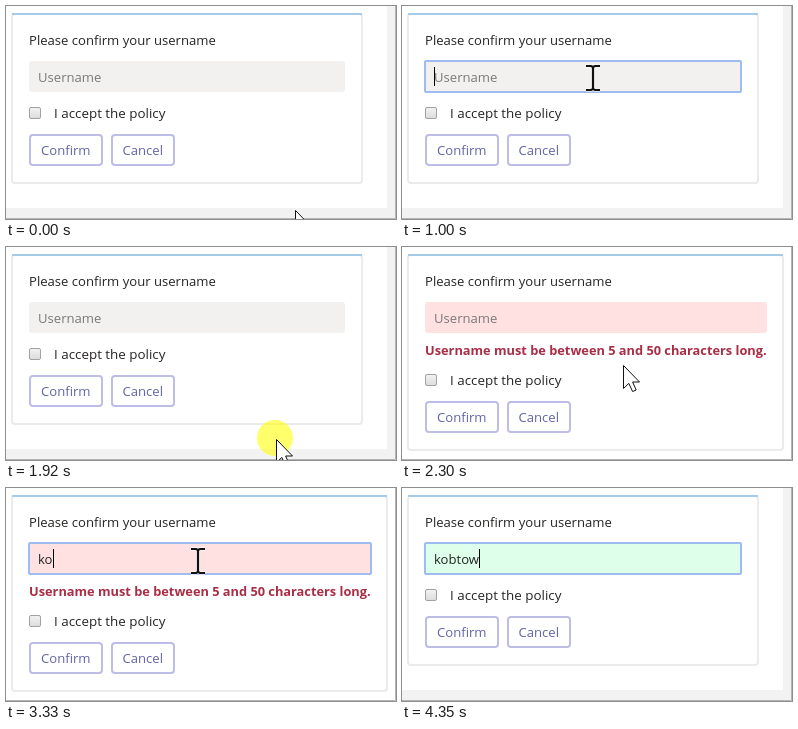
An HTML page that plays this animation: 390x213 px, repeating every 5.74 s.

```html
<!DOCTYPE html>
<html lang="en">
<head>
<meta charset="utf-8">
<title>Username form</title>
<style>
html, body { margin: 0; width: 100%; height: 100%; overflow: hidden; background: #fff; }
svg { display: block; font: 13.1px "Open Sans", "Noto Sans", sans-serif; font-variant-ligatures: none; }
text { fill: #252423; white-space: pre; }
.btn rect { fill: #fff; stroke: #bdbde6; stroke-width: 2; }
.btn text { fill: #6264a7; }
</style>
</head>
<body>
<svg width="390" height="213" viewBox="0 0 390 213">
  <defs>
    <linearGradient id="boxFill" x2="0" y2="1">
      <stop stop-color="#f2f2f2"/><stop offset="1" stop-color="#dcdcdc"/>
    </linearGradient>
  </defs>
  <rect width="390" height="213" fill="#fff"/>
  <path id="strips" d="M381 0h8v212H0v-10h381z" fill="#f3f2f2"/>
  <path d="M389.5 0V212.5H0" fill="none" stroke="#b4b4b4"/>

  <rect id="card" x="6" y="8" rx="3" fill="#fff" stroke="#ebebeb" stroke-width="2"/>
  <path id="topLine" fill="none" stroke="#a6cbe9" stroke-width="2"/>
  <text x="23" y="39">Please confirm your username</text>

  <rect id="field" x="23" y="55" height="31" rx="3"/>
  <rect id="ring" x="23" y="55" height="31" rx="1" fill="none" stroke="#9fbcf0" stroke-width="2"/>
  <text id="hint" x="32" y="76" style="fill:#7a7878">Username</text>
  <text id="value" x="32" y="76"></text>
  <rect id="caret" y="61" width="1" height="19" fill="#000"/>
  <text id="error" x="23" y="108" style="fill:#a82d45;font-weight:700;font-size:12.8px">Username must be between 5 and 50 characters long.</text>

  <g id="lower">
    <rect x="23.5" y="101.5" width="11" height="11" rx="1.5" fill="url(#boxFill)" stroke="#a2a2a2"/>
    <text x="48" y="112" font-size="13.4">I accept the policy</text>
    <g class="btn">
      <rect x="24" y="129" width="72" height="30" rx="3"/>
      <text x="35" y="149">Confirm</text>
      <rect x="106" y="129" width="62" height="30" rx="3"/>
      <text x="116.5" y="149">Cancel</text>
    </g>
  </g>

  <circle id="glow" r="18" fill="#ff0" fill-opacity=".58"/>
  <path id="arrow" d="M.5 .5V23.5L5.8 18.4L9.6 26.5L13.2 25L9.6 17H16.5Z" fill="#fff" stroke="#111"/>
  <g id="beam" fill="none">
    <path d="M-7 -12H-2L0 -11L2 -12H7M0 -11V11M-7 12H-2L0 11L2 12H7" stroke="#fff" stroke-opacity=".6" stroke-width="4"/>
    <path d="M-7 -12H-2L0 -11L2 -12H7M0 -11V11M-7 12H-2L0 11L2 12H7" stroke="#111" stroke-width="2.2"/>
  </g>
</svg>
<script>
const LOOP = 5740;
const NAME = "kobtow";
const KEYS = [2930, 3330, 3710, 4030, 4180, 4350];
const CLICKS = [[610, 690], [1920, 2000], [2830, 2930]];
// first step, last step, step count, target x, target y, easing power
const MOVES = [
  [80, 460, 6, 182, 61, 1.5],
  [1000, 1380, 6, 257, 156, 0.7],
  [1460, 1920, 7, 270, 192, 3],
  [2080, 2460, 6, 188, 68, 1.3],
  [2610, 2610, 1, 192, 73, 1]
];

const el = {};
for (const node of document.querySelectorAll("[id]")) el[node.id] = node;

const within = (t, a, b) => t >= a && t < b;
const show = (node, on) => node.setAttribute("visibility", on ? "visible" : "hidden");
const moveTo = (node, x, y) => node.setAttribute("transform", `translate(${x} ${y})`);

function pointer(t) {
  let x = 289, y = 204;
  for (const [start, end, steps, tx, ty, power] of MOVES) {
    if (t < start) break;
    const gap = (end - start) / (steps - 1) || 1;
    const step = Math.min(steps, Math.floor((t - start) / gap + 0.1) + 1);
    const p = 1 - Math.pow(1 - step / steps, power);
    x += (tx - x) * p;
    y += (ty - y) * p;
  }
  return [Math.round(x), Math.round(y)];
}

function drawForm(t) {
  const invalid = within(t, 2000, 4180);
  const valid = t >= 4180;
  const right = invalid ? 381 : 356;
  const drop = invalid ? 26 : 0;
  const focus = within(t, 610, 1920) || t >= 2830;

  show(el.strips, !invalid);
  el.card.setAttribute("width", right - 6);
  el.card.setAttribute("height", 169 + drop);
  el.topLine.setAttribute("d", `M6 8H${right}`);

  for (const box of [el.field, el.ring]) box.setAttribute("width", right - 40 + (invalid ? 1 : 0));
  el.field.setAttribute("fill", invalid ? "#ffe1e1" : valid ? "#deffe9" : "#f2f1f0");
  show(el.ring, focus);
  show(el.error, invalid);
  moveTo(el.lower, 0, drop);

  const typed = NAME.slice(0, KEYS.filter(k => t >= k).length);
  el.value.textContent = typed;
  show(el.hint, !typed);
  el.caret.setAttribute("x", 32 + Math.round(typed ? el.value.getComputedTextLength() : 0));
  show(el.caret, focus && !within(t, 1150, 1610));
}

function drawPointer(t) {
  const [x, y] = pointer(t);
  const onField = x < 340 && y > 54 && y < 87;
  const beam = onField && !within(t, 2080, 2610);
  const here = t < 4180;
  moveTo(el.arrow, x, y);
  moveTo(el.beam, x, y);
  moveTo(el.glow, beam && t > 2000 ? x - 3 : x - 1, y - 1);
  show(el.arrow, here && !beam);
  show(el.beam, here && beam);
  show(el.glow, CLICKS.some(([a, b]) => within(t, a, b)));
}

function render(t) {
  drawForm(t);
  drawPointer(t);
}

let origin;
function tick(now) {
  if (origin === undefined) origin = now;
  render((now - origin) % LOOP);
  requestAnimationFrame(tick);
}
render(0);
requestAnimationFrame(tick);
</script>
</body>
</html>
```
